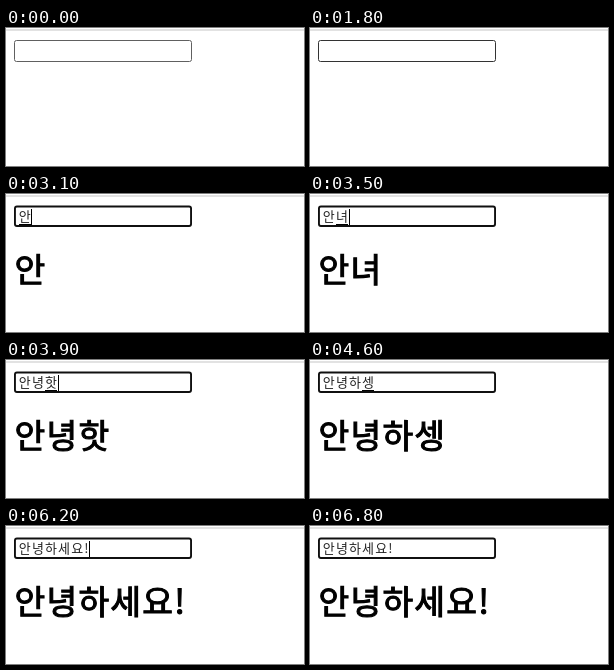
An HTML page for the animation above (7000 ms loop, 298x138 px).

```html
<!DOCTYPE html>
<html lang="ko">
<head>
<meta charset="utf-8">
<style>
  html, body { margin: 0; width: 100%; height: 100%; overflow: hidden; background: #fff; }
  svg { display: block; width: 100%; height: 100%; }
  text { font-family: "Noto Sans CJK KR", "Noto Sans CJK", sans-serif; }
  #value { font-size: 13px; font-weight: 300; letter-spacing: 1.14px; fill: #222; }
  #title { font-size: 33.4px; font-weight: 400; letter-spacing: 1.2px; stroke: #000; stroke-width: 1.1px; }
</style>
</head>
<body>
<svg viewBox="0 0 298 138">
  <rect y="1" width="298" height="2" fill="#e2e2e2"/>
  <rect id="field" rx="2" fill="#fff"/>
  <text id="value" x="12.8" y="27"></text>
  <rect id="underline" y="30" width="12" height="1"/>
  <rect id="caret" y="15" width="1" height="16"/>
  <text id="title" x="8.6" y="88.2"></text>
</svg>
<script>
const LOOP = 7000, BLINK = 500, ADVANCE = 13.1, TEXT_X = 12.8;
const HOVER = 1800, FOCUS = 2000, COMMIT = 5100, LAST_BLINK = 5200;

const typing = [
  [0, ''], [2800, 'ㅇ'], [2900, '아'], [3000, '안'],
  [3300, '안ㄴ'], [3400, '안녀'], [3600, '안녕'],
  [3700, '안녕ㅎ'], [3800, '안녕하'], [3900, '안녕핫'],
  [4000, '안녕하세'], [4100, '안녕하셍'], [4800, '안녕하세요'],
  [COMMIT, '안녕하세요!']
];

const [field, value, underline, caret, title] =
  ['field', 'value', 'underline', 'caret', 'title'].map(id => document.getElementById(id));

function setAttributes(el, attributes) {
  for (const name in attributes) el.setAttribute(name, attributes[name]);
}

function show(el, visible) {
  el.style.display = visible ? '' : 'none';
}

function drawField(t) {
  const focused = t >= FOCUS;
  const width = focused ? 1.9 : 1;
  const top = focused ? 11.6 : 12;
  const height = focused ? 21.3 : 22;
  setAttributes(field, {
    x: 8 + width / 2, y: top + width / 2,
    width: 178 - width, height: height - width,
    'stroke-width': width,
    stroke: focused ? '#101010' : t >= HOVER ? '#333' : '#606060'
  });
}

function caretVisible(t, typedAt) {
  if (t < FOCUS) return false;
  const since = t >= LAST_BLINK ? LAST_BLINK : Math.max(typedAt, FOCUS);
  return Math.floor((t - since) / BLINK) % 2 === 0;
}

function draw(t) {
  const [typedAt, text] = typing.filter(step => step[0] <= t).pop();
  const syllables = text.replace('!', '').length;
  const end = TEXT_X + syllables * ADVANCE + (text.endsWith('!') ? 4.8 : 0);

  drawField(t);
  value.textContent = title.textContent = text;
  underline.setAttribute('x', Math.round(end - ADVANCE));
  show(underline, text && t < COMMIT);
  caret.setAttribute('x', Math.floor(end));
  show(caret, caretVisible(t, typedAt));
}

const start = performance.now();
function tick() {
  draw((performance.now() - start) % LOOP);
  requestAnimationFrame(tick);
}
tick();
</script>
</body>
</html>
```
